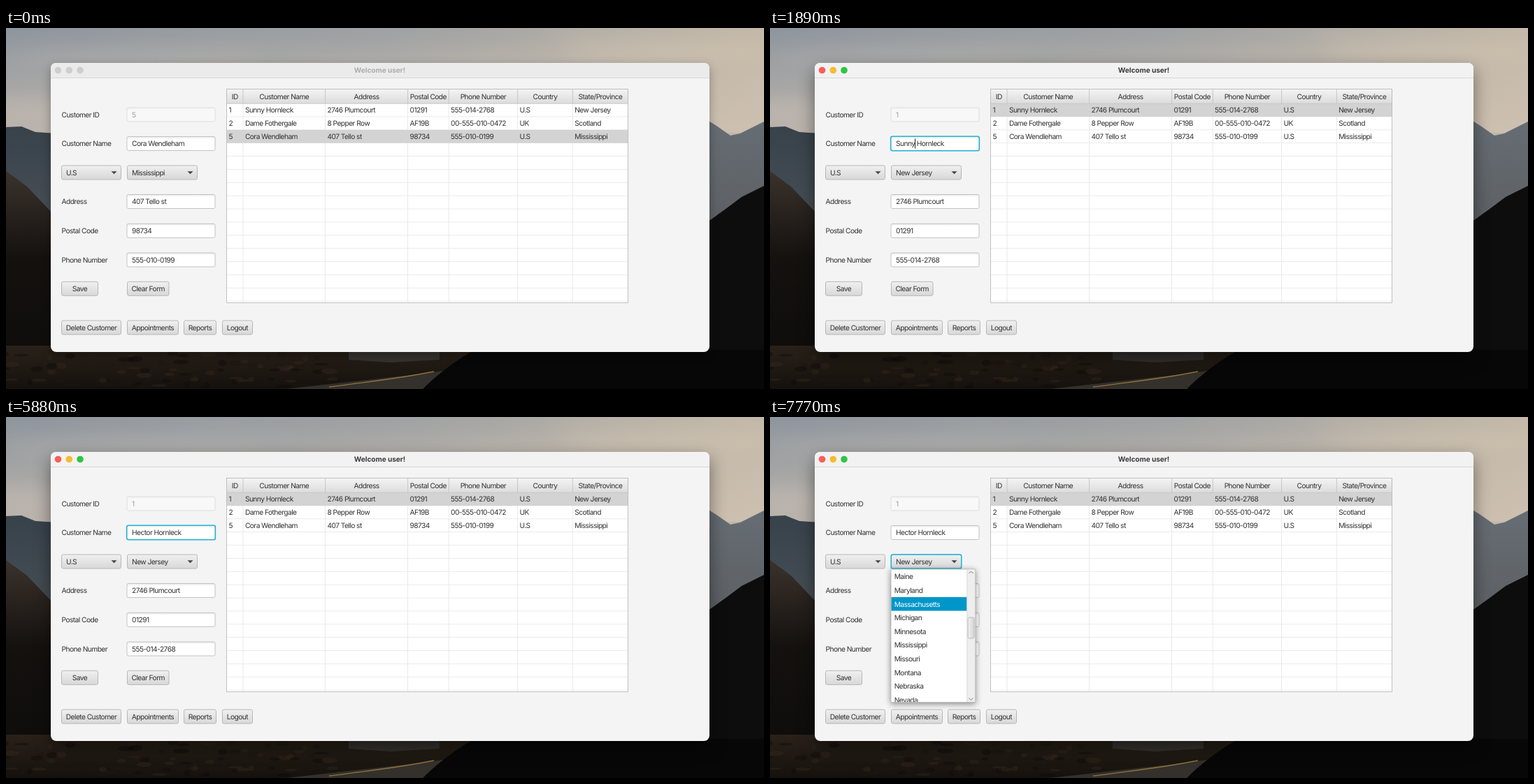
Animation, 1084 px wide and 517 px high, one loop 8 s. Source, as an HTML page:

```html
<!DOCTYPE html>
<html lang="en">
<head>
<meta charset="utf-8">
<title>Customer form</title>
<style>
  html, body { margin: 0; width: 100%; height: 100%; overflow: hidden; background: #0e0c0b; }
  svg { display: block; width: 100vw; height: 100vh; }
  text {
    font: 10.2px Inter, "Liberation Sans", sans-serif;
    letter-spacing: -.55px;
    fill: #323232;
    text-rendering: geometricPrecision;
    white-space: pre;
  }
  .mid { text-anchor: middle; }
  .title { font-weight: 700; letter-spacing: -.1px; }
</style>
</head>
<body>
<svg id="stage" viewBox="0 0 1084 517" preserveAspectRatio="none">
  <defs>
    <linearGradient id="sky"><stop stop-color="#8d959d"/><stop offset=".5" stop-color="#a3a4a5"/><stop offset="1" stop-color="#c4b9a8"/></linearGradient>
    <linearGradient id="haze" x2="0" y2="1"><stop stop-color="#d2c4b4" stop-opacity="0"/><stop offset="1" stop-color="#d2c4b4" stop-opacity=".65"/></linearGradient>
    <linearGradient id="farLeft" x2="0" y2="1"><stop stop-color="#38424b"/><stop offset="1" stop-color="#4c5459"/></linearGradient>
    <linearGradient id="farRight" x2="0" y2="1"><stop stop-color="#666d74"/><stop offset="1" stop-color="#5c5f62"/></linearGradient>
    <linearGradient id="hill" x2="0" y2="1"><stop stop-color="#3b322c"/><stop offset=".4" stop-color="#14110f"/><stop offset="1" stop-color="#0d0b0a"/></linearGradient>
    <linearGradient id="ground" x2="0" y2="1"><stop stop-color="#2a2119"/><stop offset="1" stop-color="#15110d"/></linearGradient>
    <linearGradient id="button" x2="0" y2="1"><stop stop-color="#f0f0f0"/><stop offset="1" stop-color="#d8d8d8"/></linearGradient>
    <linearGradient id="hover" x2="0" y2="1"><stop stop-color="#f8f8f8"/><stop offset="1" stop-color="#e3e3e3"/></linearGradient>
    <linearGradient id="head" x2="0" y2="1"><stop stop-color="#f4f4f4"/><stop offset="1" stop-color="#dcdcdc"/></linearGradient>
    <linearGradient id="inset" x2="0" y2="1"><stop stop-color="#e9e9e9"/><stop offset=".18" stop-color="#fff"/></linearGradient>
    <linearGradient id="thumb"><stop stop-color="#efefef"/><stop offset="1" stop-color="#d6d6d6"/></linearGradient>
    <filter id="blur" x="-50%" y="-100%" width="200%" height="300%"><feGaussianBlur stdDeviation="12"/></filter>
    <clipPath id="listClip"><path d="M173 218h121v190h-121z"/></clipPath>
  </defs>
  <path fill="url(#sky)" d="M0 0h1084v517H0z"/>
  <path fill="url(#haze)" d="M0 0h1084v150H0z"/>
  <g filter="url(#blur)" opacity=".35">
    <ellipse cx="180" cy="42" rx="190" ry="9" fill="#c4bcb6"/>
    <ellipse cx="560" cy="8" rx="240" ry="9" fill="#8f979f"/>
    <ellipse cx="940" cy="34" rx="150" ry="12" fill="#dccdb6"/>
    <ellipse cx="20" cy="118" rx="60" ry="14" fill="#d2c3b8"/>
  </g>
  <path fill="url(#farLeft)" d="M0 142l22-1 20 8 60 4v170H0z"/>
  <path fill="url(#hill)" d="M0 205l30 22 40 42v248H0z"/>
  <path fill="url(#farRight)" d="M1000 130l16 10 20 14 14-3 34-17v160h-84z"/>
  <path fill="#0e0d0d" d="M1000 280l28-20 24-18 32-16v291h-84z"/>
  <path fill="url(#ground)" d="M0 455h700v62H0z"/>
  <g id="bushes"></g>
  <path fill="#35322f" d="M490 464h130v11l-70 4-60-4z"/>
  <path fill="#34302c" d="M400 517c80-9 160-17 240-28v28z"/>
  <path fill="none" stroke="#8f723d" stroke-width="1.3" d="M462 514c55-7 100-12 150-22"/>
  <path fill="#080707" d="M596 517c22-22 46-40 74-56h414v56z"/>
</svg>
<script>
const LOOP = 8000;
const stage = document.getElementById('stage');

function add(tag, attrs, parent = stage, content = '') {
  const node = document.createElementNS('http://www.w3.org/2000/svg', tag);
  for (const key in attrs) node.setAttribute(key, attrs[key]);
  node.textContent = content;
  parent.append(node);
  return node;
}
const box = (x, y, width, height, fill, more = {}, parent = stage) =>
  add('rect', { x, y, width, height, fill, ...more }, parent);
const label = (x, cy, content, more = {}, parent = stage) =>
  add('text', { x, y: cy + 3.7, ...more }, parent, content);
const show = (node, on) => { node.style.display = on ? '' : 'none'; };

// Roadside scrub
let seed = 11;
const random = () => (seed = seed * 16807 % 2147483647) / 2147483647;
const bushes = document.getElementById('bushes');
for (let i = 0; i < 90; i++) {
  add('ellipse', {
    cx: random() * 470, cy: 466 + random() * 48, rx: 3 + random() * 9, ry: 1.5 + random() * 3,
    fill: ['#0f0c0a', '#32271c', '#1d1611'][i % 3], opacity: .45
  }, bushes);
}

// Window
const frame = box(64, 50, 942, 414, '#f4f4f4', { rx: 8 });
const titleBar = add('path', { d: 'M64 71.5V58q0-8 8-8H998q8 0 8 8V71.5z' });
box(64, 71, 942, 1, '#d9d8d9');
const lights = [74.5, 90.3, 106].map(cx => add('circle', { cx, cy: 60.5, r: 4.8 }));
const title = label(534.5, 60.3, 'Welcome user!', { class: 'mid title' });

// Form
function field(cy, value = '', more = {}) {
  const group = add('g', more);
  box(173, cy - 10, 126, 20, 'url(#inset)', { rx: 2.2, stroke: '#bdbdbd', 'stroke-width': .9 }, group);
  return label(180, cy, value, {}, group);
}
const face = (x, cy, width, parent = stage) =>
  box(x + .5, cy - 10, width - 1, 20, 'url(#button)', { rx: 2.3, stroke: '#b0b0b0', 'stroke-width': .9 }, parent);
function button(x, cy, width, caption) {
  face(x, cy, width);
  label(x + width / 2, cy, caption, { class: 'mid' });
}
function combo(x, width) {
  const back = face(x, 207, width);
  add('path', { d: `M${x + width - 14.5} 205.3h8l-4 4z`, fill: '#454545' });
  return { back, text: label(x + 7, 207, '') };
}
const ring = (x, y, width, height, rx) =>
  box(x, y, width, height, 'none', { rx, stroke: '#1fb4d6', 'stroke-width': 1.5 });

[[124, 'Customer ID'], [165.5, 'Customer Name'], [248.5, 'Address'], [290.3, 'Postal Code'], [332, 'Phone Number']]
  .forEach(([cy, caption]) => label(79.5, cy, caption));
const idText = field(124, '', { opacity: .45 });
const nameText = field(165.5);
const addressText = field(248.5);
const postalText = field(290.3);
const phoneText = field(332);
const selection = box(180, 158.5, 0, 14, '#0096c9');
nameText.parentNode.insertBefore(selection, nameText);
const caret = box(0, 158.5, 1, 14, '#222');
const country = combo(79, 86);
const region = combo(173, 101);
button(79, 373.3, 53, 'Save');
button(173, 373.3, 60.5, 'Clear Form');
button(79, 429, 86, 'Delete Customer');
button(173, 429, 74, 'Appointments');
button(254, 429, 47, 'Reports');
button(309, 429, 44, 'Logout');

// Table
const edges = [315.5, 339, 456.6, 574.6, 633.2, 731.6, 810.3, 889.5];
const heads = ['ID', 'Customer Name', 'Address', 'Postal Code', 'Phone Number', 'Country', 'State/Province'];
const people = [
  ['1', 'Sunny Hornleck', '2746 Plumcourt', '01291', '555-014-2768', 'U.S', 'New Jersey'],
  ['2', 'Dame Fothergale', '8 Pepper Row', 'AF19B', '00-555-010-0472', 'UK', 'Scotland'],
  ['5', 'Cora Wendleham', '407 Tello st', '98734', '555-010-0199', 'U.S', 'Mississippi']
];
const PITCH = 18.87, TOP = 108.2;
box(315.5, 87.5, 574, 306, '#fff');
for (let i = 1; i <= 15; i++) box(316, TOP + i * PITCH - .5, 573, .8, '#e6e6e6');
edges.slice(1, -1).forEach(x => box(x - .4, TOP, .8, 285, '#e4e4e4'));
const rowMark = box(316, 0, 573.5, PITCH, '#d3d3d3');
box(315.5, 87.5, 574, 20.7, 'url(#head)');
box(315.5, 107.7, 574, .9, '#c3c3c3');
heads.forEach((caption, i) => {
  box(edges[i + 1] - .4, 88, .9, 20, '#c3c3c3');
  label((edges[i] + edges[i + 1]) / 2, 98, caption, { class: 'mid' });
});
const rows = people.map((person, r) => {
  const group = add('g', {});
  person.forEach((value, i) => label(edges[i] + 2.9, TOP + (r + .5) * PITCH, value, {}, group));
  return group;
});
box(315.5, 87.5, 574, 306, 'none', { stroke: '#bababa', 'stroke-width': .9 });

const rings = {
  table: ring(315.2, 87.3, 574.6, 306.4, 0),
  name: ring(172.6, 155.2, 126.8, 20.6, 2.5),
  region: ring(173.2, 196.9, 100.6, 20.2, 2.5)
};

// Drop-down list
const popup = add('g', {});
box(173, 218, 120.5, 190.5, '#fff',
  { stroke: '#bababa', 'stroke-width': .9, style: 'filter:drop-shadow(0 2px 4px rgba(0,0,0,.45))' }, popup);
const list = add('g', { 'clip-path': 'url(#listClip)' }, popup);
const ITEM = 19.65;
const itemMark = box(173.5, 0, 108, ITEM, '#0096c9', {}, list);
const items = ['Maine', 'Maryland', 'Massachusetts', 'Michigan', 'Minnesota', 'Mississippi', 'Missouri', 'Montana', 'Nebraska', 'Nevada']
  .map((state, i) => label(177.7, 228.5 + i * ITEM, state, {}, list));
box(281.7, 218.5, 11.5, 189.5, '#eeeeee', {}, popup);
box(281.5, 218.5, .7, 189.5, '#cfcfcf', {}, popup);
box(283, 287, 9, 30, 'url(#thumb)', { rx: 2, stroke: '#b0b0b0', 'stroke-width': .8 }, popup);
add('path', { d: 'M284.5 224l3-3 3 3M284.5 402.5l3 3 3-3', fill: 'none', stroke: '#777', 'stroke-width': 1 }, popup);

// Each step changes part of the state from its time on
const steps = [
  [0, { active: false, focus: 'table', row: 2, name: people[2][1], caret: -1, selected: 0, hover: false, open: false, item: -1 }],
  [840, { active: true }],
  [910, { row: 0, name: people[0][1] }],
  [1890, { focus: 'name', caret: 5 }],
  [2310, { selected: 5, caret: -1 }],
  [2450, { selected: 0 }],
  [2520, { caret: 0 }],
  [2730, { caret: -1 }],
  [3290, { caret: 0 }],
  [3500, { selected: 3, caret: -1 }],
  [3570, { selected: 5 }],
  [4130, { selected: 0, name: 'H Hornleck', caret: 1 }],
  [4410, { name: 'He Hornleck', caret: 2 }],
  [4830, { name: 'Hec Hornleck', caret: 3 }],
  [4970, { name: 'Hecto Hornleck', caret: 5 }],
  [5040, { name: 'Hector Hornleck', caret: 6 }],
  [5530, { caret: -1 }],
  [5810, { hover: true }],
  [5880, { hover: false }],
  [6090, { caret: 6 }],
  [6580, { caret: -1 }],
  [6930, { hover: true }],
  [7140, { caret: 6 }],
  [7490, { focus: 'region', caret: -1, hover: false, open: true }],
  [7630, { item: 0 }],
  [7700, { item: 1 }],
  [7770, { item: 2 }]
];

const widthOf = count => count > 0 ? nameText.getSubStringLength(0, count) : 0;

function draw(s) {
  frame.style.filter = s.active
    ? 'drop-shadow(0 10px 12px rgba(0,0,0,.45))'
    : 'drop-shadow(0 5px 7px rgba(0,0,0,.3))';
  titleBar.setAttribute('fill', s.active ? '#f3f2f3' : '#ebebeb');
  title.style.fill = s.active ? '#3c3b3c' : '#aeadae';
  lights.forEach((light, i) =>
    light.setAttribute('fill', s.active ? ['#f95f56', '#f6bb2f', '#2fc545'][i] : '#cfcecf'));

  const [id, , address, postal, phone, land, state] = people[s.row];
  idText.textContent = id;
  addressText.textContent = address;
  postalText.textContent = postal;
  phoneText.textContent = phone;
  country.text.textContent = land;
  region.text.textContent = state;
  region.back.setAttribute('fill', s.hover ? 'url(#hover)' : 'url(#button)');

  nameText.textContent = '';
  add('tspan', { style: 'fill:#fff' }, nameText, s.name.slice(0, s.selected));
  add('tspan', {}, nameText, s.name.slice(s.selected));
  selection.setAttribute('width', widthOf(s.selected));
  show(caret, s.caret >= 0);
  caret.setAttribute('x', 179.6 + widthOf(s.caret));

  const lit = s.active && s.focus === 'table';
  rowMark.setAttribute('y', TOP + s.row * PITCH);
  rowMark.setAttribute('fill', lit ? '#0096c9' : '#d3d3d3');
  rows.forEach((row, i) => {
    for (const cell of row.children) cell.style.fill = lit && i === s.row ? '#fff' : '';
  });
  for (const key in rings) show(rings[key], s.active && s.focus === key);

  show(popup, s.open);
  show(itemMark, s.item >= 0);
  itemMark.setAttribute('y', 218.6 + s.item * ITEM);
  items.forEach((item, i) => { item.style.fill = i === s.item ? '#fff' : ''; });
}

let shown = 0;
function tick() {
  const time = performance.now() % LOOP;
  const past = steps.filter(([start]) => start <= time);
  if (past.length !== shown) {
    shown = past.length;
    draw(Object.assign({}, ...past.map(([, change]) => change)));
  }
  requestAnimationFrame(tick);
}
tick();
</script>
</body>
</html>
```
